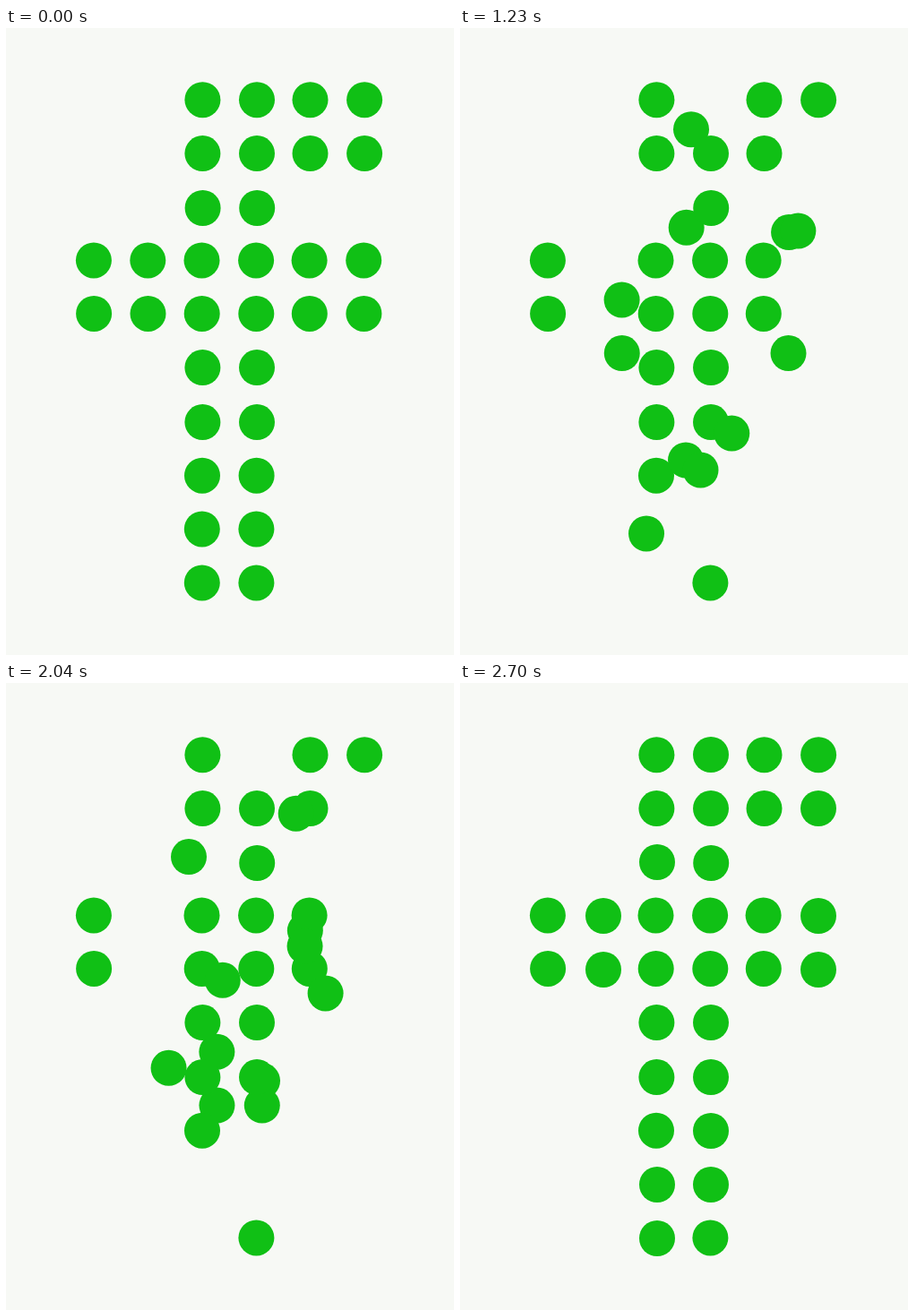
Animation, 500 px wide and 700 px high, one loop 3.6 s. Source, as an HTML page with a canvas:

```html
<!DOCTYPE html>
<html lang="en">
<head>
<meta charset="utf-8">
<title>Dots</title>
<style>
  html, body { margin: 0; height: 100%; overflow: hidden; background: #f7f9f5; }
  canvas { display: block; }
</style>
</head>
<body>
<canvas id="stage" width="500" height="700"></canvas>
<script>
const LOOP = 3600, START = 900, STEP = 30, STEPS = 60, RADIUS = 20;
const ctx = document.getElementById('stage').getContext('2d');

// The letter is a loosely set grid: column centres, then each row's pattern, y and x shift
const columns = [98.8, 159.2, 219.4, 280, 339.5, 400.1];
const rows = [
  ['  ####', 80.2, 0],
  ['  ####', 140.1, 0],
  ['  ##  ', 201, 0.2],
  ['######', 259.4, -0.9],
  ['######', 318.9, -0.7],
  ['  ##  ', 379.1, 0],
  ['  ##  ', 440.1, 0],
  ['  ##  ', 499.7, -0.4],
  ['  ##  ', 559.4, -0.6],
  ['  ##  ', 619.4, -0.6]
];
const dots = rows.flatMap(([pattern, y, shift]) =>
  columns.map(x => ({ x: x + shift, y })).filter((_, i) => pattern[i] === '#'));

// Each dot of a cycle travels to the tidy grid place of the next one
const cycles = [[27, 15, 1, 11], [7, 30, 17, 29, 8, 21, 28]];
const snap = v => Math.round(v / 20) * 20;
for (const cycle of cycles) {
  cycle.forEach((id, i) => {
    const next = dots[cycle[(i + 1) % cycle.length]];
    dots[id].goal = { x: snap(next.x), y: snap(next.y) };
  });
}
dots[cycles[0][0]].lead = 1; // this one sets off a step early

function draw() {
  const time = performance.now() % LOOP;
  const step = Math.min(Math.floor((time - START) / STEP), STEPS);

  ctx.fillStyle = '#f7f9f5';
  ctx.fillRect(0, 0, 500, 700);
  ctx.fillStyle = '#10c015';
  for (const { x, y, goal = { x, y }, lead = 0 } of dots) {
    const p = step < 0 ? 0 : (step + lead) / (STEPS + lead);
    ctx.beginPath();
    ctx.arc(x + (goal.x - x) * p, y + (goal.y - y) * p, RADIUS, 0, 2 * Math.PI);
    ctx.fill();
  }
  requestAnimationFrame(draw);
}
draw();
</script>
</body>
</html>
```
